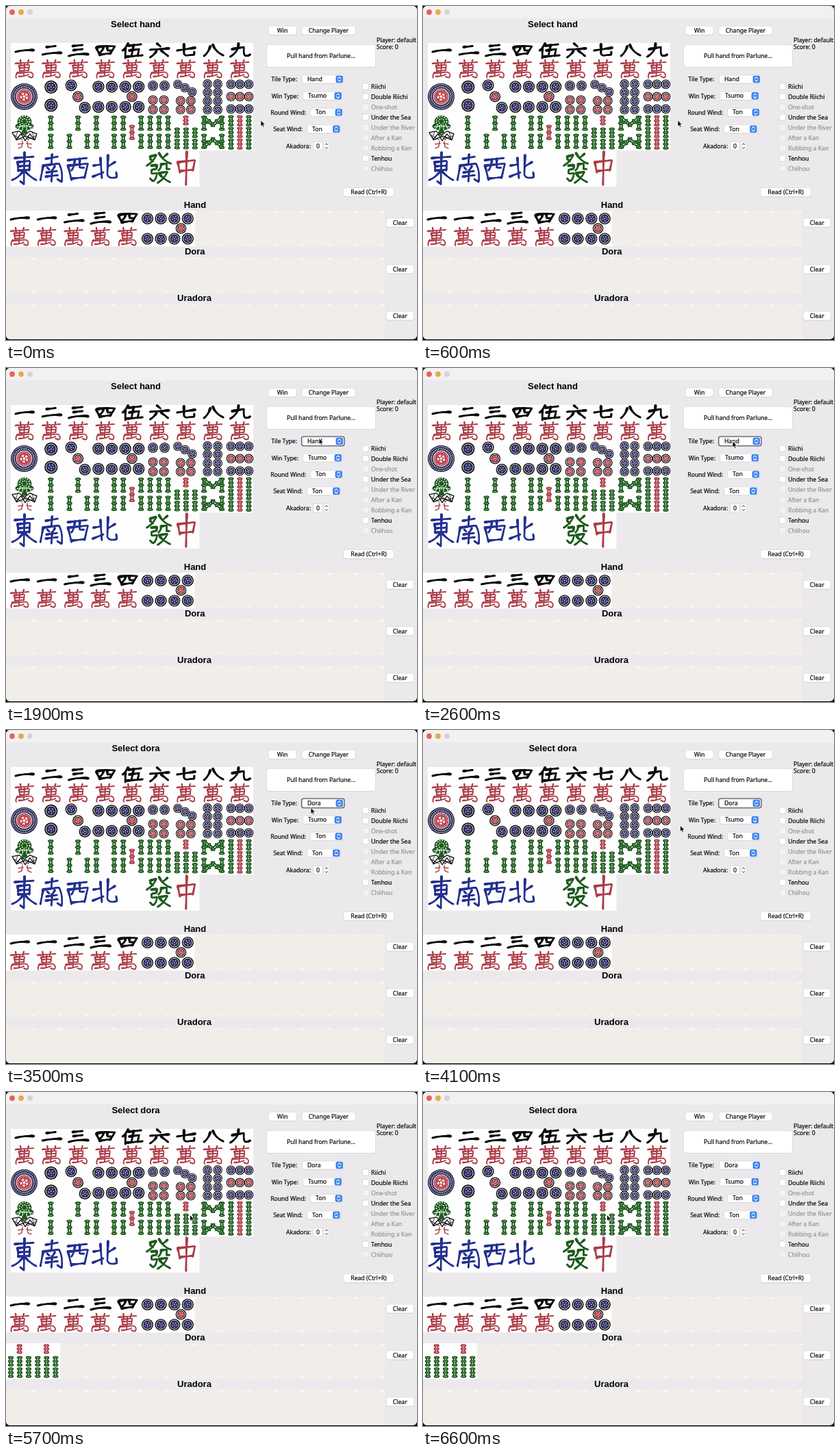
Recreate the animation shown at these times as an HTML page. Size 600 by 488 pixels, loop 6800 ms.

```html
<!DOCTYPE html>
<html lang="en">
<head>
<meta charset="utf-8">
<title>Tile picker</title>
<style>
  html, body { margin: 0; width: 100%; height: 100%; overflow: hidden; background: #000; }
  svg { display: block; width: 600px; height: 488px; }
  text { font: 500 8.6px "Noto Sans", "Open Sans", sans-serif; fill: #0c0c0c; stroke: #0c0c0c; stroke-width: .22px; }
  .head { font: bold 13px "Liberation Sans", Arial, sans-serif; fill: #000; stroke: none; text-anchor: middle; }
  .mid { text-anchor: middle; }
  .end { text-anchor: end; }
  .check { font-size: 8.7px; }
  .off { fill: #969496; stroke: #969496; }
</style>
</head>
<body>
<svg id="stage" viewBox="0 0 600 488" xmlns="http://www.w3.org/2000/svg"></svg>
<script>
const LOOP = 6800, STEP = 100;
const TILE_W = 39.3, TILE_H = 52.4;
const BLACK = '#0b0b0b', RED = '#ac3c47', NAVY = '#33326c', GREEN = '#1d5a1d', BLUE = '#22308f';

// ---- basic shapes ----
const rect = (x, y, w, h, fill, r = 0, extra = '') =>
  `<rect x="${x}" y="${y}" width="${w}" height="${h}" rx="${r}" fill="${fill}" ${extra}/>`;
const disc = (x, y, r, fill, extra = '') =>
  `<circle cx="${x}" cy="${y}" r="${r}" fill="${fill}" ${extra}/>`;
const oval = (x, y, rx, ry, fill) =>
  `<ellipse cx="${x}" cy="${y}" rx="${rx}" ry="${ry}" fill="${fill}"/>`;
const ring = (x, y, r, color, w, dash = '') =>
  disc(x, y, r, 'none', `stroke="${color}" stroke-width="${w}" stroke-dasharray="${dash}"`);
const text = (x, y, s, cls = '', id = '') =>
  `<text x="${x}" y="${y}" class="${cls}"${id && ` id="${id}"`}>${s}</text>`;
const line = (d, color, w) =>
  `<path d="${d}" fill="none" stroke="${color}" stroke-width="${w}" stroke-linecap="round" stroke-linejoin="round"/>`;
const use = (id, x, y) => `<use href="#${id}" x="${x}" y="${y}"/>`;

// Ink strokes: pressed at the start, light in the middle, tapering to the end
const probe = document.createElementNS('http://www.w3.org/2000/svg', 'path');
function brush(d, color, w) {
  return d.split(/(?=M)/).map(stroke => {
    probe.setAttribute('d', stroke);
    const len = probe.getTotalLength(), n = Math.ceil(len / 2.2);
    const at = i => {
      const p = probe.getPointAtLength(len * i / n);
      return `${p.x.toFixed(1)} ${p.y.toFixed(1)}`;
    };
    let out = '';
    for (let i = 0; i < n; i++) {
      const k = (i + .5) / n;
      out += line(`M${at(i)}L${at(i + 1)}`, color, (w * (1.1 - .3 * Math.sin(Math.PI * k) - .3 * k)).toFixed(2));
    }
    return out;
  }).join('');
}

// ---- tiles ----
const numerals = [
  'M33 10.5Q18 10 7 13',
  'M13 6L26 4.5M34 14.5Q20 14 7 17',
  'M12 4.5L26 3M13 10.5L26 9M34 16.5Q20 15 6 19',
  'M7 7L12 18M8 6Q20 4 34 5L27 16M17 6Q17 11 12 14M23 5L23 11L28 11M12 17L28 15',
  'M14 1Q11 7 6 11M10 8L10 22M15 4L33 2M22 3L19 19M16 11L30 9L28 19M12 20L35 18',
  'M17 1L22 5M34 8L7 10M16 12Q13 17 7 21M23 11L33 19',
  'M33 7L7 11M17 2L17 15Q17 19 24 18L32 17L32 13',
  'M16 5Q14 13 7 19M20 3Q24 13 35 18',
  'M9 9L26 6Q25 15 27 18Q30 20 35 17M18 1Q18 13 6 20'
];
const myriad = 'M7 30L33 28M14 25L15 32M26 25L24 32M12 33L13 41M12 33L27 32L26 40M13 36.5L26 36M13 41L26 40' +
  'M20 31L19 48M10 43Q6 48 8 51M9 44L29 42.5Q35 46 31 51L26 49M12 49Q20 49 26 46';

const honours = [
  [BLUE, 'M6 11L33 9M20 3L19 49L14 45M10 17L11 30M10 17L28 15L27 29M11 23L27 22M11 29L27 28M18 30Q12 39 2 43M20 29Q27 38 37 43'],
  [BLUE, 'M12 12L29 9M21 6L20 19M8 22L4 43M8 22L31 19Q37 30 35 46L29 42M14 25L17 28M25 23L22 28M13 32L28 30M12 38L29 36M21 29L20 45'],
  [BLUE, 'M5 14L32 11M15 13Q14 24 10 29M22 12L22 25L28 25M5 22L10 43M5 22L34 19L29 40M10 41L29 39'],
  [BLUE, 'M13 11L15 40M3 22L14 20M2 38L17 32M24 7L23 35Q25 42 37 39L36 32M34 17L24 23'],
  null,
  [GREEN, 'M7 9L16 6Q12 16 2 22M7 12L11 16M20 4Q26 15 37 19M32 5L25 11M9 22L17 21L16 27L9 28L9 34L17 33Q16 42 11 45L7 41' +
    'M23 20Q23 26 19 29M23 20L31 19L31 27L35 27M20 33L32 31Q28 41 18 47M21 35Q27 42 36 46'],
  [RED, 'M8 17L11 32M8 17L33 14L30 29M11 30L30 28M21 2L20 50']
];

function pin(x, y, r, color = NAVY) {
  return disc(x, y, r, BLACK) + ring(x, y, r * .77, '#fff', 1) + disc(x, y, r * .64, color) +
    ring(x, y, r * .38, '#eeeaf2', 1.3, `1.2 ${(r * .4775 - 1.2).toFixed(2)}`) + disc(x, y, .8, '#eeeaf2');
}
const redPin = (x, y, r) => pin(x, y, r, '#b9434f');

function stick(x, y, h = 22, color = GREEN, turn = 0) {
  const e = h / 2 - 2;
  return `<g transform="translate(${x} ${y}) rotate(${turn})">` +
    rect(-2.6, -e, 5.2, 2 * e, color) +
    [-e, 0, e].map(n => oval(0, n, 4.2, 2.2, color) + rect(-2, n - .3, 4, .6, '#dfe9df')).join('') +
    [-e / 2, e / 2].map(n => rect(-.6, n - e / 5, 1.2, e / 2.5, '#fff')).join('') + '</g>';
}
const redStick = (x, y, h) => stick(x, y, h, RED);

// Calls a mark at every crossing of the given columns and rows
const grid = (mark, xs, ys, size, color) =>
  ys.map(y => xs.map(x => mark(x, y, size, color)).join('')).join('');

const wheel = disc(19.5, 26, 19.5, '#1f1f45') + ring(19.5, 26, 17.6, '#fff', .7) +
  ring(19.5, 26, 14.4, '#fff', 2.4, '1 1.51') + disc(19.5, 26, 11.8, '#fff') +
  disc(19.5, 26, 10.8, '#b9434f') + ring(19.5, 26, 8.9, '#fff', 1, '1.4 1.4') +
  ring(19.5, 26, 4.4, '#f6dfe2', 3, '3.4 2.13') + disc(19.5, 26, 1.8, '#fff');

const bird = oval(20, 10, 10.5, 9, GREEN) + oval(20, 17, 13.5, 6, GREEN) +
  ring(20, 10, 7.6, '#fff', 1.8, '1.6 2') + ring(20, 10, 4, '#fff', 1.5, '1.4 1.6') +
  line('M9 18Q20 14 32 18M11 21L14 17M17 22L18 16M23 22L23 16M30 21L27 17', '#f2f7f0', 1.1) +
  line('M2 26L12 24L20 30L28 24L38 28M2 26L8 36L15 28L21 38L28 28L35 37L38 28M8 37L22 31L35 37', BLACK, 1.3) +
  line('M5 30L17 37M25 36L36 31M10 25L7 33M31 25L34 34M16 28L26 37', BLACK, .8) + oval(20, 25, 4, 3, GREEN) +
  line('M17 39L16 47L11 49M24 39L25 47L30 49M11 43L18 42M23 42L30 43', RED, 1.4);

const cols = [7, 20, 33], pair = [10, 29.5], edge = [7, 33], ends = [12.5, 39];
const pins = [
  wheel,
  grid(pin, [19.5], [12, 38.5], 9.6),
  pin(9.5, 9.5, 8.5) + redPin(19.5, 26, 8) + pin(29.5, 42, 8.5),
  grid(pin, pair, [11.5, 41], 8.6),
  grid(pin, pair, [11.5, 41], 8.6) + redPin(19.7, 26, 7.8),
  grid(pin, [11, 28], [10], 7.4) + grid(redPin, [11, 27], [31, 45], 7),
  pin(8, 8, 6.7) + pin(18.5, 13, 6.7) + pin(29, 19, 6.7) + grid(redPin, [12, 27], [32, 45], 6.9),
  grid(pin, [12, 27], [7.5, 20, 32.5, 45], 6.8),
  grid(pin, cols, [8, 44], 6.8) + grid(redPin, cols, [26], 6.8)
];
const sticks = [
  bird,
  grid(stick, [19], ends, 22),
  stick(19.5, 12.5) + grid(stick, edge, [39], 22),
  grid(stick, edge, ends, 22),
  grid(stick, edge, ends, 22) + redStick(19.7, 26, 22),
  grid(stick, cols, ends, 22),
  redStick(19.7, 8.5, 14) + grid(stick, cols, [26.5, 43], 15),
  grid(stick, edge, ends, 22) + stick(14, 10, 19, GREEN, -52) + stick(26, 10, 19, GREEN, 52) +
    stick(14, 41, 19, GREEN, 52) + stick(26, 41, 19, GREEN, -52),
  grid(stick, [7, 33], [9, 26, 43], 16) + grid(redStick, [20], [9, 26, 43], 16)
];

const myriadInk = brush(myriad, RED, 2.5);
const faces = {
  m: numerals.map(d => brush(d, BLACK, 4) + myriadInk),
  p: pins,
  s: sticks,
  h: honours.map(h => h ? brush(h[1], h[0], 3.8) : '')
};
const back = rect(0, 0, TILE_W + .3, TILE_H, '#fefefe');
const tileDefs = Object.entries(faces).map(([suit, list]) =>
  list.map((face, i) => `<g id="${suit}${i + 1}">${back}${face}</g>`).join('')).join('');

// ---- window controls ----
const SHADOW = 'stroke="#d3d0d2" stroke-width=".6"';
const button = (x, y, w, h, label) =>
  rect(x, y + .6, w, h, '#cfccce', 3.5) + rect(x, y, w, h, '#fff', 3.5, SHADOW) +
  text(x + w / 2, y + h / 2 + 3.1, label, 'mid');

function combo(x, y, w, label, id = '') {
  const ax = x + w - 6.5;
  return rect(x, y + .5, w, 12, '#cfccce', 3) + rect(x, y, w, 12, '#fff', 3, SHADOW) +
    text(x + 7.5, y + 9, label, '', id) + rect(ax - 5, y + .8, 10.4, 10.4, '#3c82f0', 2.5) +
    line(`M${ax - 2} ${y + 4.8}l2.2 -2l2.2 2M${ax - 2} ${y + 7.2}l2.2 2l2.2 -2`, '#fff', 1.1);
}

const checks = [['Riichi', 1], ['Double Riichi', 1], ['One-shot', 0], ['Under the Sea', 1], ['Under the River', 0],
  ['After a Kan', 0], ['Robbing a Kan', 0], ['Tenhou', 1], ['Chiihou', 0]];
const checkList = checks.map(([label, on], i) => {
  const y = 117.6 + i * 15;
  return rect(520.5, y - 4.6, 9, 9, on ? '#fff' : '#f4f2f3', 2, `stroke="${on ? '#cdcacc' : '#dedbdd'}" stroke-width=".6"`) +
    text(533, y + 3.3, label, on ? 'check' : 'check off');
}).join('');

function strip(title, cx, y) {
  let marks = '';
  for (let i = 1; i <= 14; i++) {
    const x = i * TILE_W;
    marks += `M${x - 3} ${y + 2.2}l3 -1.6l3 1.6l-3 1zM${x - 3} ${y + 50}l3 -1l3 1l-3 1.6z`;
  }
  return text(cx, y - 3.6, title, 'head') + rect(0, y, 553, 52.4, '#f1eee9') +
    `<path d="${marks}" fill="#fff" opacity=".8"/>` + button(555, y + 11, 40.5, 13, 'Clear');
}

const board = rect(7, 54, 354, 157, '#fefefe') + rect(7, 211, 275, 52.4, '#fefefe') +
  Object.entries(faces).map(([suit, list], row) => list.map((_, i) =>
    use(suit + (i + 1), 7 + i * TILE_W, 54 + row * TILE_H)).join('')).join('');
const hand = ['m1', 'm1', 'm2', 'm3', 'm4', 'p4', 'p5'].map((id, i) => use(id, i * TILE_W, 299)).join('');

document.getElementById('stage').innerHTML = `<defs>${tileDefs}
  <clipPath id="frame">${rect(0, 0, 600, 487, '#fff', 6)}</clipPath></defs>
  <g clip-path="url(#frame)">` +
  rect(0, 0, 600, 488, '#ebe9eb') + rect(0, 0, 600, 18, '#f2f0f1') +
  disc(9, 9, 3.9, '#e0655f') + disc(22, 9, 3.9, '#e2ac48') + disc(35, 9, 3.9, '#d5d3d5') +
  text(189.5, 31, 'Select hand', 'head', 'title') + board +
  button(383, 29.3, 41, 13, 'Win') + button(432, 29.3, 78, 13, 'Change Player') +
  button(380.5, 56.5, 159, 33, 'Pull hand from Parlune...') +
  text(541, 53, 'Player: default') + text(541, 63, 'Score: 0') +
  text(425, 110.3, 'Tile Type:', 'end') + combo(432.5, 101, 60.5, 'Hand', 'type') +
  rect(431.5, 100.2, 62.5, 13.6, 'none', 3, 'id="focus" stroke="#5d606b" stroke-width="1.3"') +
  text(427, 134.7, 'Win Type:', 'end') + combo(433.5, 125.3, 57.5, 'Tsumo') +
  text(438, 159, 'Round Wind:', 'end') + combo(444.5, 149.4, 47.5, 'Ton') +
  text(433, 183.2, 'Seat Wind:', 'end') + combo(439.5, 173.8, 49, 'Ton') +
  text(445, 207.6, 'Akadora:', 'end') + rect(449, 198.6, 13, 12, '#fff', 0, SHADOW) + text(453, 207.6, '0') +
  rect(463.5, 198.4, 8.5, 12.4, '#fff', 3.5, SHADOW) + line('M466 202.8l1.8 -2l1.8 2M466 206.6l1.8 2l1.8 -2', '#333', 1) +
  checkList + button(492.5, 265.6, 74, 13, 'Read (Ctrl+R)') +
  strip('Hand', 276, 299) + strip('Dora', 275.8, 367) + strip('Uradora', 275, 435) + hand +
  `<g id="dora1">${use('s7', 0, 367)}</g><g id="dora2">${use('s7', TILE_W, 367)}</g>
  <path id="cursor" d="M0 0V9L2 7.2L3.4 10.2L4.9 9.5L3.5 6.6H6.3Z" fill="#000" stroke="#fff" stroke-width=".7"/></g>`;

// ---- motion ----
const path = [[0, 372, 167], [800, 372, 167], [1500, 457, 102.5], [2200, 457, 102.5],
  [3100, 445, 113.5], [3800, 445, 113.5], [4500, 268.5, 179.5], [LOOP, 268.5, 179.5]];
const [title, type, focus, dora1, dora2, cursor] =
  ['title', 'type', 'focus', 'dora1', 'dora2', 'cursor'].map(id => document.getElementById(id));

const ease = k => k * k * (3 - 2 * k);
function cursorAt(t) {
  const i = path.findIndex(p => p[0] > t);
  const [t0, x0, y0] = path[i - 1], [t1, x1, y1] = path[i];
  const k = ease((t - t0) / (t1 - t0));
  return [x0 + (x1 - x0) * k, y0 + (y1 - y0) * k];
}
const show = (el, on) => el.setAttribute('visibility', on ? 'visible' : 'hidden');

function draw() {
  const t = Math.floor(performance.now() % LOOP / STEP) * STEP;
  const picked = t >= 3100;
  title.textContent = picked ? 'Select dora' : 'Select hand';
  type.textContent = picked ? 'Dora' : 'Hand';
  show(focus, t >= 1500 && t < 4500);
  show(dora1, t >= 4500);
  show(dora2, t >= 5200);
  cursor.setAttribute('transform', `translate(${cursorAt(t)})`);
  requestAnimationFrame(draw);
}
draw();
</script>
</body>
</html>
```
